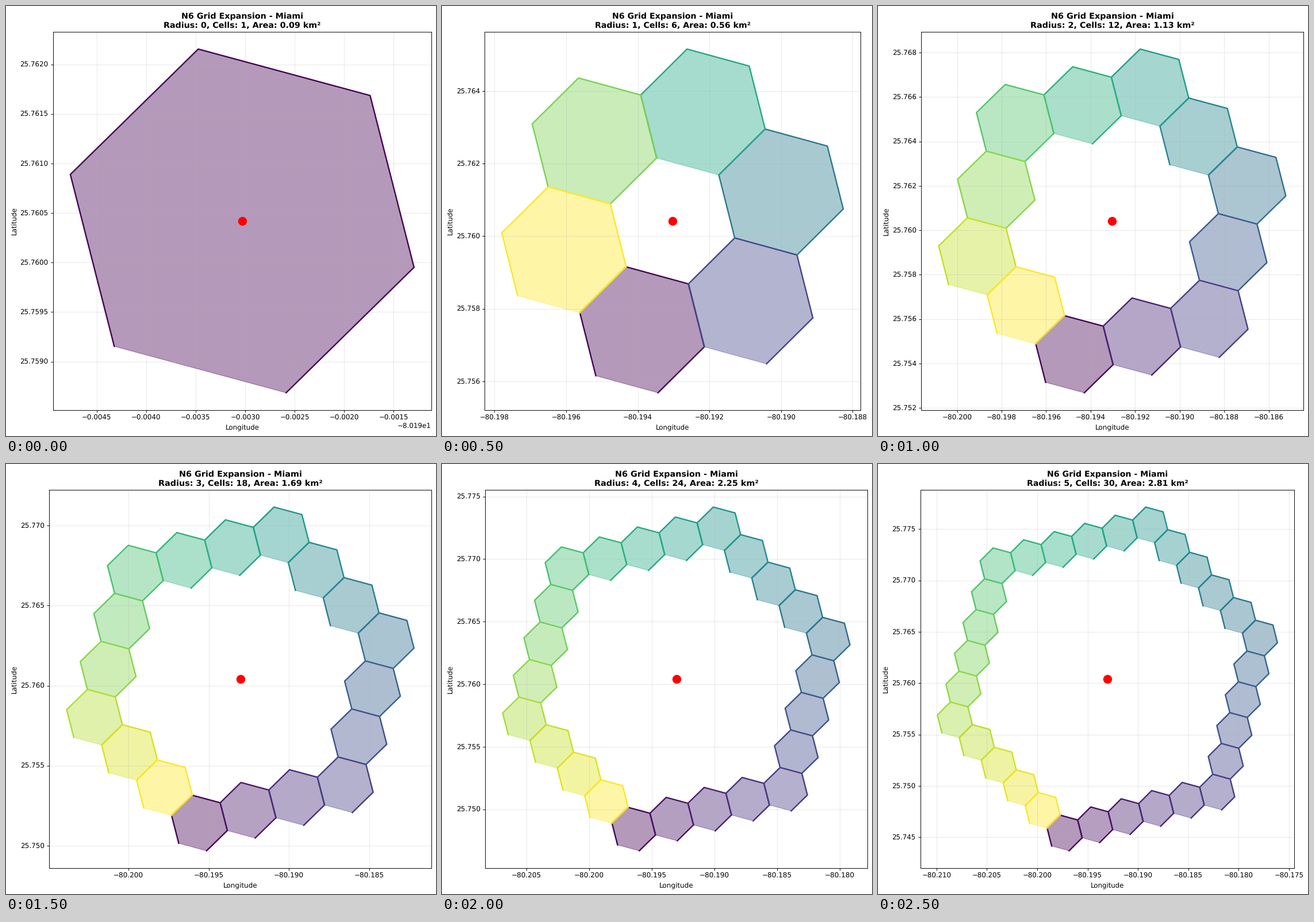
Animation, 748 px wide and 748 px high, one loop 3000 ms. Source, as a matplotlib script:

```python
import numpy as np
import matplotlib.pyplot as plt
from matplotlib.animation import FuncAnimation

SIZE = 748
DPI = 85
TOP, BOTTOM = 45.0, 702.7
# left and right edge of the plot box in pixels, one pair per radius
EDGES = [(82.0, 739.7), (74.3, 727.7), (75.3, 739.6),
         (75.3, 739.9), (75.3, 739.9), (73.7, 724.4)]

CENTER = np.array([-80.19303, 25.76042])
CELL_AREA = 0.0938

# hexagon corners in degrees, clockwise from the top one
A = np.array([-0.000444, 0.001735])
B = np.array([0.001737, -0.000469])
CORNERS = np.array([A, A + B, B, -A, -A - B, -B])
OUTLINE = CORNERS[[3, 2, 1, 0, 5, 4]]  # open along the lower edge

# steps to the six neighbours, counterclockwise from the bottom one
STEPS = [CORNERS[(3 - i) % 6] + CORNERS[(4 - i) % 6] for i in range(6)]


def ring(radius):
    """Cell centers of the hollow ring, counterclockwise."""
    if radius == 0:
        return [CENTER]
    cells = []
    for side in range(6):
        start, end = STEPS[side], STEPS[(side + 1) % 6]
        for j in range(radius):
            cells.append(CENTER + (radius - j) * start + j * end)
    return cells


def set_limits(cells):
    points = np.vstack([cell + CORNERS for cell in cells])
    low, high = points.min(axis=0), points.max(axis=0)
    margin = 0.05 * (high - low)
    ax.set_xlim(low[0] - margin[0], high[0] + margin[0])
    ax.set_ylim(low[1] - margin[1], high[1] + margin[1])


def draw(radius):
    ax.clear()
    left, right = EDGES[radius]
    ax.set_position([left / SIZE, 1 - BOTTOM / SIZE,
                     (right - left) / SIZE, (BOTTOM - TOP) / SIZE])
    scale = (right - left) / (7.7 * DPI)

    cells = ring(radius)
    colors = plt.cm.viridis(np.linspace(0, 1, len(cells)))
    for cell, color in zip(cells, colors):
        x, y = (cell + OUTLINE).T
        ax.fill(x, y, color=color, alpha=0.4)
        ax.plot(x, y, color=color, linewidth=2)
    ax.plot(*CENTER, "ro", markersize=12, zorder=5)

    set_limits(cells)
    ax.grid(True, alpha=0.3)
    ax.tick_params(labelsize=10 * scale)
    ax.xaxis.get_offset_text().set_fontsize(10 * scale)
    ax.set_xlabel("Longitude", fontsize=10 * scale)
    ax.set_ylabel("Latitude", fontsize=10 * scale)
    n = len(cells)
    ax.set_title(f"N6 Grid Expansion - Miami\nRadius: {radius}, Cells: {n}, "
                 f"Area: {n * CELL_AREA:.2f} km²",
                 fontsize=12 * scale, fontweight="bold")
    return []


plt.rcParams["font.family"] = "DejaVu Sans"
plt.rcParams["text.hinting"] = "none"
fig = plt.figure(figsize=(SIZE / DPI, SIZE / DPI), dpi=DPI, facecolor="white")
ax = fig.add_axes([0.1, 0.1, 0.8, 0.8])

anim = FuncAnimation(fig, draw, frames=len(EDGES), interval=500,
                     init_func=lambda: draw(0), repeat=True)
plt.show()
```
